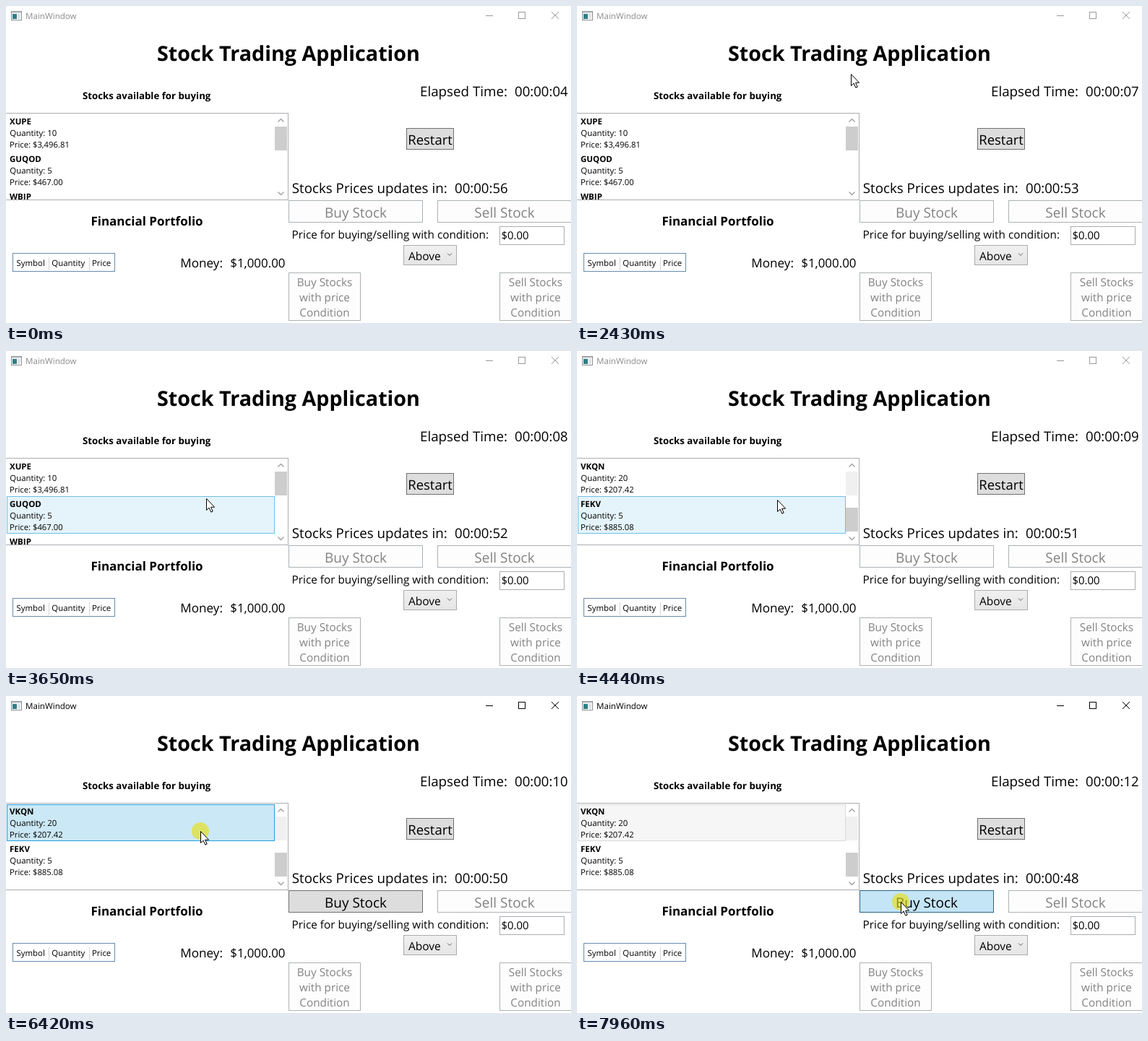
Write an HTML page that moves like this. It is 782 px wide and 439 px high and loops after 8 s.

```html
<!DOCTYPE html>
<html lang="en">
<head>
<meta charset="utf-8">
<title>Stock Trading Application</title>
<style>
  html, body { margin: 0; height: 100%; overflow: hidden; background: #fff; }
  svg { display: block; width: 100vw; height: 100vh; }
  text { font-family: "Open Sans", "Noto Sans", sans-serif; text-rendering: geometricPrecision; white-space: pre; }
  rect, .crisp { shape-rendering: crispEdges; }
</style>
</head>
<body>
<svg id="stage" viewBox="0 0 782 439">
  <defs>
    <clipPath id="listClip"><rect x="1" y="149" width="389" height="119"/></clipPath>
    <linearGradient id="combo" x2="0" y2="1">
      <stop stop-color="#f0f0f0"/><stop offset="1" stop-color="#e5e5e5"/>
    </linearGradient>
  </defs>
</svg>
<script>
const LOOP = 8000, GREY = '#838383', EDGE = '#adb2b5', OFF = '#fdfdfd';
const stage = document.getElementById('stage');

function add(tag, attrs, parent = stage) {
  const el = document.createElementNS('http://www.w3.org/2000/svg', tag);
  set(el, attrs);
  return parent.appendChild(el);
}
function set(el, attrs) {
  for (const k in attrs) el.setAttribute(k, attrs[k]);
}
function show(el, on) {
  el.style.display = on ? '' : 'none';
}
// One pixel outline covering x..x+w, y..y+h
function box(x, y, w, h, fill, stroke, parent) {
  return add('rect', { x: x + .5, y: y + .5, width: w - 1, height: h - 1, fill, stroke }, parent);
}
function text(str, x, y, size, more = {}, parent) {
  const el = add('text', { x, y, 'font-size': size, ...more }, parent);
  el.textContent = str;
  return el;
}
function line(d, stroke, more = {}) {
  return add('path', { d, stroke, fill: 'none', ...more });
}
const bold = { 'font-weight': 700 }, mid = { 'text-anchor': 'middle' };

// Title bar
box(7, 7, 15, 13, '#fff', '#8a8f94');
add('rect', { x: 8, y: 8, width: 13, height: 2, fill: '#c9ced3' });
add('rect', { x: 9, y: 11, width: 6, height: 7, fill: '#2f7f86' });
add('rect', { x: 16, y: 11, width: 4, height: 7, fill: '#dde3e7' });
const caption = text('MainWindow', 27, 18, 11.6);
const controls = [
  line('M664 13.5h10', '', { class: 'crisp' }),
  line('M709.5 8.5h9v9h-9z', '', { class: 'crisp' }),
  line('M755 8l10 10m0-10l-10 10', '')
];

// Headings and labels
text('Stock Trading Application', 391, 76, 28.7, { ...bold, ...mid });
text('Stocks available for buying', 194.7, 129, 13.25, { ...bold, ...mid });
text('Financial Portfolio', 195, 304, 17, { ...bold, ...mid });
text('Elapsed Time:', 573, 125, 18.75);
const elapsed = text('', 704, 125, 18.6);
text('Stocks Prices updates in:', 395.8, 259, 18.75);
const left = text('', 621, 259, 18.6);
text('Price for buying/selling with condition:', 395.6, 322, 15.3);
text('Money:', 241.3, 362, 17.1);
text('$1,000.00', 386.5, 362, 16.9, { 'text-anchor': 'end' });

// Portfolio grid
box(9, 342, 142, 26, '#fff', '#688caf');
line('M59.5 348v18M115.5 348v18', '#d5d5d5', { class: 'crisp' });
[['Symbol', 14.5], ['Quantity', 63.3], ['Price', 119]].forEach(([s, x]) => text(s, x, 360, 11.4));

// Buttons and inputs
box(554, 169, 66, 30, '#ddd', '#707070');
text('Restart', 587, 192, 18.5, mid);
const buy = box(391, 269, 186, 31, OFF, EDGE);
const buyText = text('Buy Stock', 484, 293, 19, mid);
box(597, 269, 187, 31, OFF, EDGE);
text('Sell Stock', 690, 293, 19, { ...mid, fill: GREY });
box(683, 305, 90, 26, '#fff', '#abadb3');
text('$0.00', 685.5, 323, 14.9);
box(550, 331, 74, 28, 'url(#combo)', '#acacac');
text('Above', 557, 352, 15.5);
line('M611 342.5l3 3 3-3', '#606060');
for (const [word, x] of [['Buy', 391], ['Sell', 683]]) {
  box(x, 369, 100, 67, OFF, EDGE);
  [word + ' Stocks', 'with price', 'Condition'].forEach((s, i) =>
    text(s, x + 50, 388 + 21 * i, 15.3, { ...mid, fill: GREY }));
}

// Stock list, its left border lies off stage
box(-1, 148, 392, 121, '#fff', '#abadb3');
const track = add('rect', { x: 372, y: 167, width: 17, height: 33, fill: '#f0f0f0' });
const thumb = add('rect', { x: 372, width: 17, height: 33, fill: '#cdcdcd' });
line('M376.5 160.5l4-4 4 4M376.5 257.5l4 4 4-4', '#a0a0a0', { 'stroke-width': 1.4 });
const rows = [box(1, 150, 371, 51), box(1, 201, 371, 52)];
const pages = [
  [['XUPE', 10, '3,496.81'], ['GUQOD', 5, '467.00'], ['WBJP', 10, '250.00']],
  [['VKQN', 20, '207.42'], ['FEKV', 5, '885.08']]
].map(items => {
  const page = add('g', { 'clip-path': 'url(#listClip)' });
  items.forEach(([name, count, price], i) => {
    const y = 164 + 52 * i;
    text(name, 5, y, 11.5, bold, page);
    text('Quantity: ' + count, 5.3, y + 16, 11.4, {}, page);
    text('Price: $' + price, 5, y + 32, 11.3, {}, page);
  });
  return page;
});

// Pointer
const halo = add('circle', { r: 12, fill: '#e8de14', opacity: .65 });
const arrow = add('path', {
  d: 'M.5 .5v16l3.6-3.4 2.7 6 2.4-1-2.6-5.9h5z',
  fill: '#fff', stroke: '#000', 'stroke-width': 1
});
// time, x, y
const path = [
  [0, 493, 445], [290, 493, 445], [900, 485, 370], [1080, 466, 326], [1300, 462, 268],
  [1560, 448, 140], [1890, 396, 108], [2350, 379, 94], [2570, 379, 94], [2950, 307, 154],
  [3350, 280, 196], [3440, 278, 202], [3650, 277, 204], [3980, 277, 206], [4970, 277, 206],
  [5230, 269, 199], [5500, 269, 189], [5820, 269, 189], [5890, 269, 187], [6850, 269, 187],
  [6980, 314, 220], [7430, 448, 285], [LOOP, 448, 285]
];
function pointer(t) {
  const i = path.findIndex(p => p[0] > t);
  const [t0, x0, y0] = path[i - 1], [t1, x1, y1] = path[i];
  const k = (t - t0) / (t1 - t0);
  return [x0 + (x1 - x0) * k, y0 + (y1 - y0) * k];
}

const STYLES = {
  none: { fill: 'none', stroke: 'none' },
  hover: { fill: '#e5f4fb', stroke: '#70c0e7' },
  active: { fill: '#cbe8f6', stroke: '#26a0da' },
  inactive: { fill: '#f6f6f6', stroke: '#dadada' }
};
const clock = s => '00:00:' + String(s).padStart(2, '0');

function draw(t) {
  const [x, y] = pointer(t);
  const scrolled = t >= 3900, selected = t >= 6420, pressed = t >= 7960;
  const secs = 4 + Math.floor((t + 570) / 1000);
  elapsed.textContent = clock(secs);
  left.textContent = clock(60 - secs);

  caption.setAttribute('fill', selected ? '#000' : '#8c8c8c');
  controls.forEach(c => c.setAttribute('stroke', selected ? '#000' : '#999'));

  show(pages[0], !scrolled);
  show(pages[1], scrolled);
  show(track, scrolled);
  thumb.setAttribute('y', scrolled ? 217 : 167);
  const over = x >= 372 || y < 150 || y >= 253 ? -1 : y < 201 ? 0 : 1;
  rows.forEach((row, i) => {
    const picked = selected && i === 0;
    set(row, STYLES[picked ? (pressed ? 'inactive' : 'active') : over === i ? 'hover' : 'none']);
  });

  const onBuy = x >= 391 && x < 577 && y >= 269 && y < 300;
  const [fill, stroke] = !selected ? [OFF, EDGE] : pressed ? ['#c4e5f6', '#2c628b']
    : onBuy ? ['#bee6fd', '#3c7fb1'] : ['#ddd', '#707070'];
  set(buy, { fill, stroke });
  buyText.setAttribute('fill', selected ? '#000' : GREY);

  const at = `translate(${Math.round(x)} ${Math.round(y)})`;
  arrow.setAttribute('transform', at);
  halo.setAttribute('transform', at);
  show(halo, pressed || (selected && t < 6630));
}

const start = performance.now();
function tick() {
  draw((performance.now() - start) % LOOP);
  requestAnimationFrame(tick);
}
tick();
</script>
</body>
</html>
```
